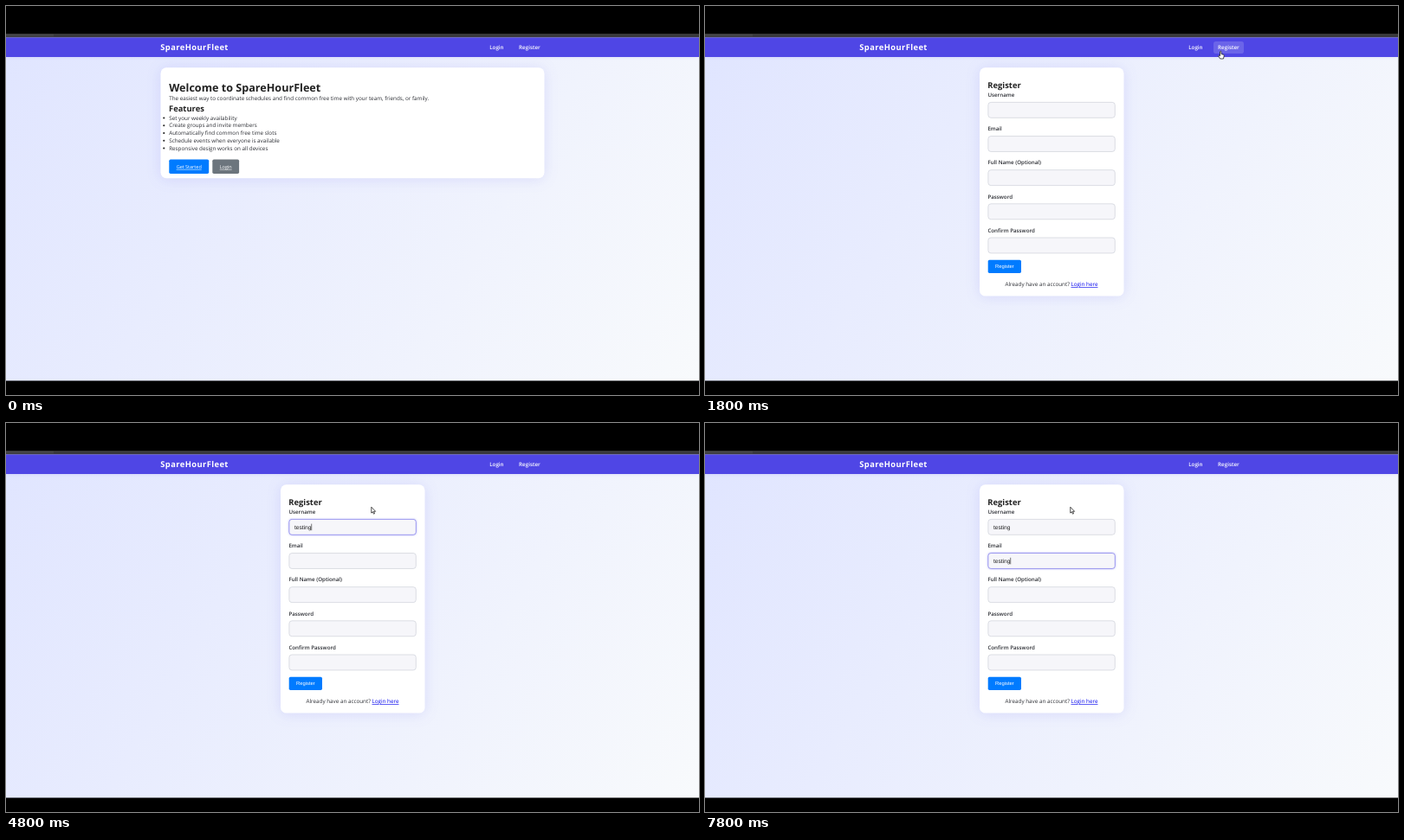
An HTML page that plays this animation: 800x450 px, repeating every 8 s.

```html
<!DOCTYPE html>
<html lang="en">
<head>
<meta charset="utf-8">
<title>Registration demo</title>
<style>
  html, body { margin: 0; width: 100%; height: 100%; overflow: hidden; background: #000; }
  svg { display: block; width: 800px; height: 450px; }
  text { font: 6.3px "Open Sans", "Noto Sans", sans-serif; fill: #2b2d33; text-rendering: geometricPrecision; white-space: pre; }
  .h1 { font-size: 12.6px; font-weight: 700; fill: #222; }
  .h2 { font-size: 9.4px; font-weight: 700; fill: #222; }
  .brand { font-size: 9.4px; font-weight: 700; letter-spacing: .4px; fill: #fff; }
  .nav { font-size: 6.25px; font-weight: 600; fill: #fff; text-anchor: middle; }
  .label { font-size: 6.2px; font-weight: 600; }
  .button { font-size: 5.5px; fill: #fff; text-anchor: middle; text-decoration: underline; }
  .submit { font: 5.83px "Liberation Sans", Arial, sans-serif; fill: #fff; text-anchor: middle; }
  .value { font: 6.67px "Liberation Sans", Arial, sans-serif; fill: #222; }
  .link { fill: #00e; text-decoration: underline; }
  .card { fill: #fff; filter: drop-shadow(0 1.7px 8px rgba(79, 70, 229, .13)); }
  .field { fill: #f6f6fa; stroke: #d3d6de; stroke-width: .8; }
  .field.focus { stroke: #8d88ec; filter: drop-shadow(0 0 1px rgba(99, 102, 241, .5)); }
  .pointer { fill: #fff; stroke: #222; stroke-width: .8; stroke-linejoin: round; }
</style>
</head>
<body>
<svg viewBox="0 0 800 450">
  <defs>
    <linearGradient id="sky" gradientUnits="userSpaceOnUse" x1="13.8" y1="12" x2="786.2" y2="458">
      <stop stop-color="#e0e5ff"/><stop offset="1" stop-color="#f8fafc"/>
    </linearGradient>
  </defs>
  <rect width="800" height="450"/>
  <rect y="32" width="800" height="5" fill="#393939"/>
  <rect y="32.5" width="55" height="3" fill="#444"/>
  <rect y="36.5" width="800" height="397" fill="url(#sky)"/>
  <rect y="36.5" width="800" height="22.5" fill="#4f46e5" style="filter:drop-shadow(0 .8px 2px rgba(79,70,229,.15))"/>
  <text class="brand" x="178.3" y="51.4">SpareHourFleet</text>
  <rect id="hover" x="587" y="41" width="35" height="14" rx="2.8" fill="#fff" fill-opacity=".16"/>
  <text class="nav" x="566.4" y="50.3">Login</text>
  <text class="nav" x="604.4" y="50.3">Register</text>

  <g id="home">
    <rect class="card" x="178.5" y="71.3" width="443" height="128" rx="6.7"/>
    <text class="h1" x="188.2" y="99">Welcome to SpareHourFleet</text>
    <text x="188.2" y="109.4">The easiest way to coordinate schedules and find common free time with your team, friends, or family.</text>
    <text class="h2" x="188" y="122">Features</text>
    <g id="features"></g>
    <rect x="188.3" y="177.5" width="45.9" height="16.5" rx="1.7" fill="#007bff"/>
    <text class="button" x="211.2" y="187.9">Get Started</text>
    <rect x="238.3" y="177.5" width="30.8" height="16.5" rx="1.7" fill="#6c757d"/>
    <text class="button" x="253.7" y="187.9">Login</text>
  </g>

  <g id="form">
    <rect class="card" x="317" y="71.3" width="166.5" height="264.3" rx="6.7"/>
    <text class="h2" x="326.3" y="95.4">Register</text>
    <g id="fields"></g>
    <rect x="326.7" y="293.7" width="38.3" height="15.2" rx="1.7" fill="#007bff"/>
    <text class="submit" x="345.9" y="303.4">Register</text>
    <text x="400" y="324.2" text-anchor="middle">Already have an account? <tspan class="link">Login here</tspan></text>
  </g>

  <rect id="caret" width=".6" height="7.6" fill="#222"/>
  <g id="cursor">
    <path id="arrow" class="pointer" d="M0 0V6.9L1.6 5.5L2.7 8L3.8 7.5L2.7 5.1H4.8Z"/>
    <path id="hand" class="pointer" d="M0 .8Q.8-.4 1.5.8V3.6L4 4.2Q4.8 4.5 4.7 5.6L4 9H.2L-2 5.8Q-1.6 4.6 0 5.8Z"/>
    <path id="beam" d="M-1.3-3.5H1.3M0-3.5V3.5M-1.3 3.5H1.3" fill="none" stroke="#222" stroke-width=".7"/>
  </g>
</svg>
<script>
const LOOP = 8000, STEP = 200;
const WORD = 'testing';
const $ = id => document.getElementById(id);
const show = (id, on) => $(id).style.display = on ? '' : 'none';
const within = (t, from, to) => t >= from && t < to;
const fieldTop = i => 111.4 + i * 39.15;

$('features').innerHTML = [
  'Set your weekly availability',
  'Create groups and invite members',
  'Automatically find common free time slots',
  'Schedule events when everyone is available',
  'Responsive design works on all devices'
].map((item, i) => {
  const y = 131.6 + i * 8.75;
  return `<circle cx="182.3" cy="${y - 2.1}" r="1.1" fill="#222"/><text x="188.2" y="${y}">${item}</text>`;
}).join('');

$('fields').innerHTML = ['Username', 'Email', 'Full Name (Optional)', 'Password', 'Confirm Password']
  .map((label, i) => {
    const y = fieldTop(i);
    return `<text class="label" x="326.4" y="${y - 6.3}">${label}</text>
      <rect class="field" x="326.9" y="${y}" width="146.4" height="17.9" rx="3.2"/>
      <text class="value" x="332.9" y="${y + 11.3}"></text>`;
  }).join('');
const boxes = document.querySelectorAll('.field');
const values = document.querySelectorAll('.value');

// Pointer path: time, x, y
const path = [[1800, 594.5, 52], [2200, 594.5, 52], [2600, 430, 119], [2800, 430, 119], [3200, 421.8, 97.2]];
function pointerAt(t) {
  const next = path.findIndex(p => p[0] > t);
  if (next < 0) return path.at(-1).slice(1);
  const [t0, x0, y0] = path[Math.max(next - 1, 0)], [t1, x1, y1] = path[next];
  const u = Math.min(1, Math.max(0, (t - t0) / (t1 - t0))), k = u * u * (3 - 2 * u);
  return [x0 + (x1 - x0) * k, y0 + (y1 - y0) * k];
}

// One letter per step, the first at the given start
const typed = (t, start) => WORD.slice(0, Math.max(0, Math.floor((t - start) / STEP) + 1));

function draw(t) {
  const registering = t >= 1800;
  show('home', !registering);
  show('form', registering);
  show('hover', within(t, 1400, 2400));

  const focus = t < 2800 ? -1 : t < 5400 ? 0 : 1;
  boxes.forEach((box, i) => box.classList.toggle('focus', i === focus));
  values[0].textContent = typed(t, 3600);
  values[1].textContent = typed(t, 6000);

  const blinkedOff = within(t, 3200, 3600) || within(t, 5200, 5400) || within(t, 7400, 7800);
  show('caret', focus >= 0 && !blinkedOff);
  if (focus >= 0) {
    $('caret').setAttribute('x', 332.9 + values[focus].getComputedTextLength());
    $('caret').setAttribute('y', fieldTop(focus) + 5.2);
  }

  const [x, y] = pointerAt(t);
  const overLink = y < 56, overField = y > 111;
  show('cursor', registering);
  show('hand', overLink);
  show('beam', overField);
  show('arrow', !overLink && !overField);
  $('cursor').setAttribute('transform', `translate(${x} ${y})`);
}

function tick() {
  const t = performance.now() % LOOP;
  draw(Math.floor(t / STEP) * STEP);
  requestAnimationFrame(tick);
}
tick();
</script>
</body>
</html>
```
